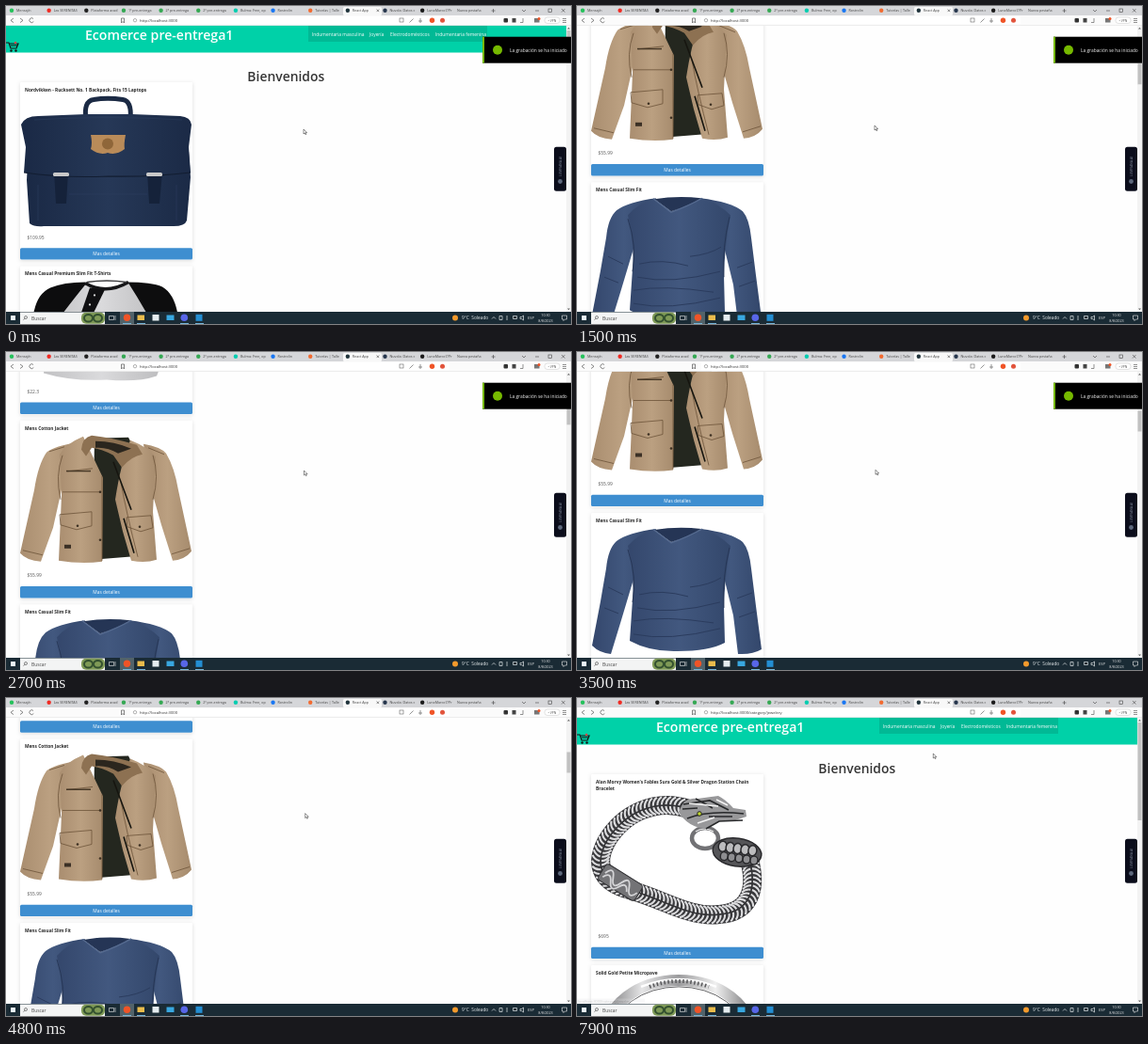
Animation of 600 by 338 pixels, one loop 8 s. Source, as an HTML page:

```html
<!DOCTYPE html>
<html lang="es">
<head>
<meta charset="utf-8">
<title>React App</title>
<style>
  html, body { margin: 0; width: 100%; height: 100%; overflow: hidden; background: #fff; }
  svg { display: block; width: 100vw; height: 100vh; }
  text { font-family: "Open Sans", "Noto Sans", sans-serif; white-space: pre; }
  .card { filter: drop-shadow(0 1.5px 2px rgba(10, 10, 10, .13)); }
</style>
</head>
<body>
<svg id="stage" viewBox="0 0 600 338" preserveAspectRatio="none"></svg>
<script>
const LOOP = 8000, STEP = 100, PITCH = 195.4;
const stage = document.getElementById('stage');

const esc = s => s.replace(/&/g, '&amp;');
const text = (x, y, s, size = 4.9, fill = '#363636', extra = '') =>
  `<text x="${x}" y="${y}" font-size="${size}" fill="${fill}" ${extra}>${esc(s)}</text>`;
const rect = (x, y, w, h, fill, extra = '') =>
  `<rect x="${x}" y="${y}" width="${w}" height="${h}" fill="${fill}" ${extra}/>`;
const dot = (x, y, r, fill, extra = '') =>
  `<circle cx="${x}" cy="${y}" r="${r}" fill="${fill}" ${extra}/>`;
const oval = (x, y, rx, ry, extra) =>
  `<ellipse cx="${x}" cy="${y}" rx="${rx}" ry="${ry}" ${extra}/>`;
const shape = (d, fill, extra = '') => `<path d="${d}" fill="${fill}" ${extra}/>`;
const line = (d, color, w = .7, extra = '') =>
  `<path d="${d}" fill="none" stroke="${color}" stroke-width="${w}" ${extra}/>`;
const shade = (id, stops) => `<linearGradient id="${id}">` +
  stops.map((c, i) => `<stop offset="${i / (stops.length - 1)}" stop-color="${c}"/>`).join('') +
  '</linearGradient>';

// Chevrons laid along a path, as in a woven chain.
function braid(d, half, gap) {
  const path = document.createElementNS('http://www.w3.org/2000/svg', 'path');
  path.setAttribute('d', d);
  let out = '';
  for (let s = 0; s < path.getTotalLength(); s += gap) {
    const a = path.getPointAtLength(s), b = path.getPointAtLength(s + 1);
    const turn = Math.atan2(b.y - a.y, b.x - a.x) * 180 / Math.PI;
    out += line(`M-3 ${-half} Q2 ${-half * .7} 2.5 -.8 M-3 ${half} Q2 ${half * .7} 2.5 .8`, '#dcdcde', 2.1,
      `transform="translate(${a.x.toFixed(1)} ${a.y.toFixed(1)}) rotate(${turn.toFixed(1)})"`);
  }
  return out;
}

// Pictures are drawn in the place of the first card on the page.
const backpack = () =>
  line('M85 121 Q82 101 93 99.5 Q108 97 124 99.5 Q134 101 132 121', '#1b2a44', 5) +
  shape('M24 145 L22 185 L25 231 Q30 235 40 234 L178 234 Q190 234 192 228 L196 182 L193 140Z', 'url(#navy)') +
  shape('M16 126 Q20 117 34 117 L85 115 L134 115 L185 117 Q196 118 197 126 L194 150 L196 177 Q150 182 108 181 Q60 182 19 177 L21 150Z', 'url(#navy)') +
  line('M19 177 Q60 183 108 181 Q155 182 196 177', '#121d31', 1.2) +
  line('M30 121 Q108 116 187 121 M34 190 V228 M181 190 V228 M67 200 H150', '#2c3e5e', .6) +
  shape('M51 177 L66 177 L64 210 L53 210Z M150 177 L166 177 L163 210 L152 210Z', '#15223a') +
  rect(50, 177, 17, 4, '#c9c9c9', 'rx="1.5"') + rect(149, 177, 17, 4, '#c9c9c9', 'rx="1.5"') +
  shape('M90 137 L127 137 Q125 147 126 152 Q117 159 108 156 Q99 159 90 152 Q92 146 90 137Z', '#b98b59') +
  dot(108, 146.5, 6, '#8f6639');

const tshirt = () =>
  shape('M84 98 Q61 98 47 104 Q34 110 30 128 L17 174 L15 183 Q27 188 40 185 L51 152 L90 130 Z', '#0d0d0e') +
  shape('M128 98 Q155 98 166 103 Q178 110 182 130 L193 178 L194 196 L168 197 L160 150 L118 125Z', '#0d0d0e') +
  shape('M84 101 Q70 118 50 145 Q45 162 43 184 L40 226 Q70 235 107 233 Q140 236 160 229 L162 224 Q155 192 160 168 L157 145 Q143 119 130 99 Q107 111 84 101Z', 'url(#heather)') +
  line('M84 99 Q106 112 130 98', '#161618', 3.5) + line('M86 98 Q107 95 128 98', '#3a3a3c', 1.5) +
  shape('M89 104 L105 106 L88 141 L77 139Z', '#101012') +
  [[94, 112], [89, 122], [84, 132]].map(p => dot(...p, 1.1, '#ddd')).join('') +
  line('M55 160 Q70 180 58 208 M143 161 Q130 182 143 213 M62 221 Q95 211 151 222 M104 137 Q126 152 145 145', '#b5b5b8', .8);

const jacket = () =>
  shape('M78 104 Q51 108 43 115 Q34 128 30 155 L15 222 Q22 230 37 231 L50 195 L60 150Z', 'url(#tan)') +
  shape('M146 106 Q164 109 170 116 Q179 131 183 155 L197 220 Q190 229 177 230 L165 192 L153 150Z', 'url(#tan)') +
  shape('M94 100 L130 99 L143 125 L142 225 L92 229Z', '#24271f') +
  shape('M82 98 Q63 106 57 117 L59 160 L56 230 Q80 234 102 231 L103 142 Q93 121 82 98Z', 'url(#tan)') +
  shape('M132 102 Q150 109 159 120 L156 178 L160 229 Q148 233 133 230 L124 199 L116 165 Q122 126 132 102Z', 'url(#tan)') +
  shape('M80 112 Q81 99 91 97 Q112 99 139 107 L145 117 Q133 119 123 131 L114 118 Q101 111 91 110 L85 119Z', '#8d7152') +
  shape('M95 103 Q115 103 133 111 L119 116 Q108 109 95 110Z', '#2b261e') +
  line('M65 135 L92 132 M60 157 H100 M57 181 L91 178 V193 L75 197 L58 192Z M128 184 L154 182 L156 195 L143 199 L129 194Z M102 140 V230 M122 147 Q128 180 140 226 M18 219 L39 224 M176 223 L195 217 M46 114 L62 109 M151 110 L168 117 M60 118 Q52 140 58 165 M156 118 Q163 140 156 165', '#6d5339', .8) +
  rect(64, 134, 26, 1.5, '#473827') + rect(62, 213, 7, 4, '#3b3025') +
  [[76, 193], [142, 194], [100, 157], [100, 208]].map(p => dot(...p, 1.3, '#3d3022')).join('') +
  line('M114 125 L133 176 M125 185 L136 222', '#16150f', 1.6);

const sweater = () =>
  shape('M84 98 Q54 102 42 111 Q33 119 31 140 L25 175 L16 222 Q24 230 36 231 L47 195 L62 145Z', 'url(#blue)') +
  shape('M131 98 Q164 102 176 112 Q183 120 185 140 L190 180 L196 226 Q186 232 171 231 L166 190 L155 145Z', 'url(#blue)') +
  shape('M82 99 Q64 104 54 116 Q61 145 59 173 L56 217 Q78 229 107 228 Q140 228 157 219 L156 180 Q157 146 163 116 Q151 104 132 98 L100 112Z', 'url(#blue)') +
  shape('M82 99 Q107 95 132 98 Q118 106 100 112Z', '#253555') +
  line('M81 98.5 L100 113 Q119 106 133 98', '#566b90', 1.2) +
  line('M54 120 Q64 150 59 176 M162 118 Q154 150 156 182', '#253554', .9) +
  line('M60 210 Q97 218 152 204 M60 196 Q92 190 145 198 M64 182 Q100 190 152 176 M66 168 Q90 162 118 170 M120 160 Q140 158 153 150 M33 160 L49 168 M29 182 L44 188 M170 172 L186 166 M172 192 L189 186', '#2b3c5e', 1);

const bracelet = () => {
  const chain = 'M119 118 C84 106 49 122 31 153 C17 180 29 197 56 204 C92 214 120 234 151 230 C182 228 192 205 183 172';
  const knot = [-16, -8, 0, 8, 16].map(x =>
    oval(x, -4, 4.5, 5.5, 'fill="#bcbcbe"') + oval(x + 3, 6, 4, 4.5, 'fill="#8d8d90"')).join('');
  return line(chain, '#39393c', 20) + braid(chain, 9, 4.5) + line(chain, '#333336', 1) +
    oval(136, 149, 14, 11, 'fill="none" stroke="#727275" stroke-width="4.5"') +
    line('M126 142 Q135 136 145 142', '#efefef', 1.2) +
    shape('M108 121 Q114 105 128 107 L150 104 Q158 108 166 117 L179 119 L180 126 L165 131 L152 131 L137 139 Q117 137 108 121Z', '#98989a') +
    line('M113 113 L141 109 L161 119 M117 128 Q140 119 177 123 M137 139 L151 131 L176 130 M126 107 L144 117 M112 118 L128 117 M140 126 L165 126', '#28292b', 1.7) +
    line('M119 112 L150 115 M128 133 L146 127 M148 108 L160 114', '#f4f4f4', 1.5) +
    dot(130, 123, 2.3, '#c0d72d', 'stroke="#222"') +
    `<g transform="translate(170 164) rotate(8)" stroke="#29292c" stroke-width="1.5">` +
    oval(0, 0, 26, 15, 'fill="#555558"') + knot + '</g>' +
    `<g transform="rotate(32 46 196)">${rect(23, 186, 46, 20, '#737376', 'rx="4" stroke="#303033"')}` +
    line('M27 196 q5 -12 10 0 t10 0 t10 0 t10 0 M27 201 q5 -10 10 0 t10 0 t10 0', '#d4d4d6', 1.8) + '</g>';
};

const ring = () =>
  oval(108, 157, 78, 60, 'fill="none" stroke="url(#silver)" stroke-width="12"') +
  oval(108, 157, 71, 53, 'fill="none" stroke="#646466" stroke-width="1"') +
  line('M68 104 Q108 88 148 104', '#fff', 2.5) +
  line('M77 104 Q108 92 140 104', '#59595b', 4, 'stroke-dasharray="1.5 2.5"');

const products = {
  bag: [['Nordvikken - Rucksett No. 1 Backpack, Fits 15 Laptops'], '$109.95', backpack],
  tee: [['Mens Casual Premium Slim Fit T-Shirts'], '$22.3', tshirt],
  coat: [['Mens Cotton Jacket'], '$55.99', jacket],
  slim: [['Mens Casual Slim Fit'], '$15.99', sweater],
  chain: [["Alan Morvy Women's Fables Sura Gold & Silver Dragon Station Chain", 'Bracelet'], '$695', bracelet],
  ring: [['Solid Gold Petite Micropave'], '$168', ring]
};

function cards(keys) {
  let y = 0;
  return keys.map(key => {
    const [title, price, picture] = products[key];
    const drop = (title.length - 1) * 7.5;
    const out = `<g transform="translate(0 ${y})">` +
      rect(15, 81, 183, 189 + drop, '#fff', 'class="card" rx="1"') +
      title.map((s, i) => text(20, 90.9 + i * 7.5, s, 4.8, '#262626', 'font-weight="700"')).join('') +
      // the two-line picture is already drawn at its lowered place
      picture() +
      text(22.5, 247.5 + drop, price, 4.9, '#555') +
      rect(15, 257.2 + drop, 183, 12.4, '#3e8ed0', 'rx="1.5"') +
      text(106.5, 265.1 + drop, 'Mas detalles', 4.9, '#fff', 'text-anchor="middle"') + '</g>';
    y += PITCH + drop;
    return out;
  }).join('');
}

const navItems = [[325, 'Indumentaria masculina'], [386, 'Joyería'], [408, 'Electrodomésticos'], [456, 'Indumentaria femenina']];
const hero = () =>
  rect(0, 20, 595, 29.5, '#00d1a8') + rect(321, 20, 190, 18, '#0a0a0a', 'opacity=".12"') +
  text(84, 35.5, 'Ecomerce pre-entrega1', 14.1, '#fff', 'font-weight="600"') +
  navItems.map(([x, s]) => text(x, 31.6, s, 4.9, '#fff')).join('') +
  line('M0 39 H3 L5 45 H11 L13 40 H4 M5 42 H12', '#141414', 1.2) +
  dot(5.5, 47.5, 1.2, '#141414') + dot(10.5, 47.5, 1.2, '#141414') + dot(10, 39, 1.3, '#e04a4a') +
  text(297.3, 79.5, 'Bienvenidos', 13.9, '#363636', 'font-weight="600" text-anchor="middle"');

const tabs = [
  ['Mensajín', '#25c15b'], ['Las SERENITAS', '#f02a22'], ['Plataforma acad', '#222'], ['1ª pre-entrega', '#35a853'],
  ['2ª pre-entrega', '#35a853'], ['2ª pre-entrega', '#35a853'], ['Bulma: Free, op', '#00cdb0'], ['Rostrolin', '#1977f3'],
  ['Tutorías | Talle', '#f26b31'], ['React App', '#20343c'], ['Nuvola: Datos c', '#26364d'], ['LunaMarco7/Pr', '#1b1b1b']
];

const browser = () =>
  rect(0, 0, 600, 10, '#d5d6d9') + rect(358, 1, 41, 9, '#f8f8f8', 'rx="1.5"') +
  tabs.map(([s, c], i) => dot(6 + i * 39.65, 4.7, 2.2, c) + text(11 + i * 39.65, 5.9, s, 3.7, '#444')).join('') +
  text(479, 5.9, 'Nueva pestaña', 3.7, '#444') +
  line('M393.6 3.5 l2.6 2.6 m0 -2.6 l-2.6 2.6 M515.5 5 h4 m-2 -2 v4 M548 4 l2 2 l2 -2 M562 5 h4 M590 3 l3.5 3.5 m0 -3.5 l-3.5 3.5', '#444', .6) +
  rect(576, 3, 3.5, 3.5, 'none', 'stroke="#444" stroke-width=".6"') +
  rect(0, 10, 600, 10.5, '#fbfbfb') + rect(132, 11, 339, 8.5, '#fff', 'rx="1.5"') + rect(0, 20.2, 600, .5, '#ddd') +
  line('M8 13 l-3 2.3 l3 2.3 M15 13 l3 2.3 l-3 2.3 M29 13.5 a2.4 2.4 0 1 0 .3 3 M122.5 13 h3 v5 l-1.5 -1.5 l-1.5 1.5z', '#555', .7) +
  dot(137, 15.2, 1.7, 'none', 'stroke="#666" stroke-width=".5"') +
  `<text id="url" x="142" y="16.6" font-size="4.15" fill="#333"></text>` +
  rect(418, 13, 4, 4, 'none', 'stroke="#666" stroke-width=".6"') +
  line('M428.5 17.5 l4 -4 M438 16 h4 m-2 -3 v5 M549 13 v4.5 h-3 M591 13.5 h4 m-4 2 h4 m-4 2 h4', '#666', .7) +
  dot(452.5, 15.3, 2.7, '#f05427') + dot(463.5, 15.3, 2.5, '#e2543c') +
  rect(528.5, 13, 4.5, 4.5, '#333', 'rx="1"') + rect(537.5, 13, 4, 4.5, '#444') +
  rect(561, 13, 5.5, 4.5, '#777') + dot(566, 13.4, 1.5, '#f05427') +
  rect(572, 12, 16, 6.5, '#fff', 'rx="3" stroke="#bbb" stroke-width=".4"') + text(575.5, 16.6, '• VPN', 3.4, '#555');

const taskbar = () =>
  rect(0, 325, 600, 13, '#1a2b35') + rect(5, 329, 5, 5, '#e9f4fa') + rect(15, 325.5, 90, 12.5, '#f3f4f4') +
  dot(21, 331, 1.5, 'none', 'stroke="#444" stroke-width=".6"') + line('M20 332 l-1.5 1.7', '#444', .6) +
  text(27, 333.5, 'Buscar', 4.9, '#444') + rect(80, 325.8, 25, 12, '#7f9a56', 'rx="5"') +
  [87.5, 97.5].map(x => oval(x, 331.8, 4.5, 3.8, 'fill="none" stroke="#33502f" stroke-width="2"')).join('') +
  rect(121, 325, 15, 13, '#52636a') +
  line('M109.5 329.5 h5 v4 h-5z M116 329 v5', '#eee', .6) +
  dot(128.5, 331.3, 3.7, '#f05427') + rect(139.5, 328.5, 7.5, 5.5, '#eabc4c') +
  rect(155.5, 328, 7, 6.5, '#e5edf0') + rect(170.5, 328.5, 8, 5.5, '#38a7df') +
  dot(189.3, 331.3, 3.8, '#5866e8') + rect(201.5, 327.8, 7, 7, '#238ed3') +
  [124, 139, 185, 201].map(x => rect(x, 337, 9, 1, '#75b5d8')).join('') +
  dot(477, 331.5, 3, '#f49a2c') + text(484, 333.3, '9°C  Soleado', 4.8, '#e8ecee') +
  line('M516 332.5 l2 -2 l2 2 M524 329.5 h3 v4 h-3z M532 329 v5 M538.5 329.5 h4 v3 h-4z M546 330.5 h1.5 l2 -1.5 v5 l-2 -1.5 h-1.5z', '#e4e8ea', .7) +
  text(554, 333.2, 'ESP', 4, '#eee') +
  text(573, 330.4, '10:30', 3.7, '#eee', 'text-anchor="middle"') + text(573, 336, '8/8/2023', 3.7, '#eee', 'text-anchor="middle"') +
  line('M590.5 329 h5 v4 h-2 l-1.5 1.5 v-1.5 h-1.5z', '#eee', .6);

const widget = () =>
  rect(582, 149.8, 13, 47, '#0b0d1b', 'rx="2.5"') + dot(588.5, 186.5, 2.4, '#5d687c') +
  text(0, 0, 'LUMIVANA.AI', 3.1, '#8d97a8', 'transform="translate(589.7 181) rotate(-90)" letter-spacing=".2"');

const toast = () =>
  rect(506, 32.7, 94, 28, '#000') + rect(506, 32.7, 2, 28, '#76b900') +
  dot(522, 46.8, 5, '#76b900') + text(535, 48.6, 'La grabación se ha iniciado', 4.85, '#f4f4f4');

stage.innerHTML = '<defs>' +
  shade('navy', ['#1a2945', '#263857', '#1b2a46']) +
  shade('heather', ['#c1c1c3', '#dadadc', '#bebec0']) +
  shade('tan', ['#a98d6f', '#bba081', '#a68b6d']) +
  shade('blue', ['#34476c', '#42587f', '#33476b']) +
  shade('silver', ['#777779', '#e5e5e6', '#9a9a9c', '#f0f0f0', '#747476']) +
  '<clipPath id="view"><rect y="20.7" width="595" height="304.3"/></clipPath></defs>' +
  rect(0, 0, 600, 338, '#fefefe') +
  '<g clip-path="url(#view)"><g id="page">' + hero() +
  `<g id="home">${cards(['bag', 'tee', 'coat', 'slim', 'chain'])}</g>` +
  `<g id="jewels">${cards(['chain', 'ring'])}</g></g></g>` +
  rect(595, 20.7, 5, 304.3, '#f3f3f3') + shape('M596 24.5 l1.5 -1.8 l1.5 1.8z M596 321.5 l1.5 1.8 l1.5 -1.8z', '#666') +
  rect(595.5, 26, 4, 22, '#c1c1c1', 'id="thumb"') +
  browser() + widget() + `<g id="toast">${toast()}</g>` +
  `<g id="status">${rect(0, 319.5, 72, 5.5, '#e6e6e8')}${text(1, 323.7, 'localhost:3000/category/jewelery', 3.7, '#555')}</g>` +
  taskbar() +
  `<g id="cursor">${shape('M0 0 V5 L1.2 3.9 L2 5.7 L2.8 5.3 L2 3.6 H3.6Z', '#fff', 'stroke="#222" stroke-width=".5"')}</g>`;

const el = id => document.getElementById(id);
const [page, home, jewels, thumb, url, toastBox, status, cursor] =
  ['page', 'home', 'jewels', 'thumb', 'url', 'toast', 'status', 'cursor'].map(el);

const scrollKeys = [[0, 0], [700, 192], [1500, 480], [1800, 535], [1950, 535], [2700, 399], [2900, 399], [4300, 626], [4500, 626], [5450, 0]];
const toastKeys = [[3600, 0], [4000, 96]];
const statusKeys = [[6700, 0], [6800, 1], [7600, 1], [7900, .25]];
const cursorX = [[0, 316], [1500, 316], [2700, 316.5], [4300, 317.5], [5600, 318], [6700, 391], [7400, 391], [7900, 378.3]];
const cursorY = [[0, 131], [700, 128.5], [1500, 127], [2700, 126], [4300, 124.5], [5500, 120], [6700, 29], [7400, 29], [7900, 59]];

function at(keys, t) {
  const i = keys.findIndex(k => k[0] > t);
  if (i === 0) return keys[0][1];
  if (i < 0) return keys[keys.length - 1][1];
  const [t0, a] = keys[i - 1], [t1, b] = keys[i];
  return a + (b - a) * (t - t0) / (t1 - t0);
}

const show = (node, on) => node.setAttribute('display', on ? 'inline' : 'none');
const move = (node, x, y) => node.setAttribute('transform', `translate(${x} ${y})`);

function draw(t) {
  const scroll = at(scrollKeys, t), loaded = t >= 7400;
  move(page, 0, -scroll);
  show(home, !loaded);
  show(jewels, loaded);
  thumb.setAttribute('y', 26 + scroll * .0735);
  thumb.setAttribute('height', loaded ? 104 : 22);
  url.textContent = 'http://localhost:3000' + (t >= 7000 ? '/category/jewelery' : '');
  move(toastBox, at(toastKeys, t), 0);
  status.setAttribute('opacity', at(statusKeys, t));
  move(cursor, at(cursorX, t), at(cursorY, t));
}

const start = performance.now();
function tick() {
  const t = (performance.now() - start) % LOOP;
  draw(Math.floor(t / STEP) * STEP);
  requestAnimationFrame(tick);
}
tick();
</script>
</body>
</html>
```
